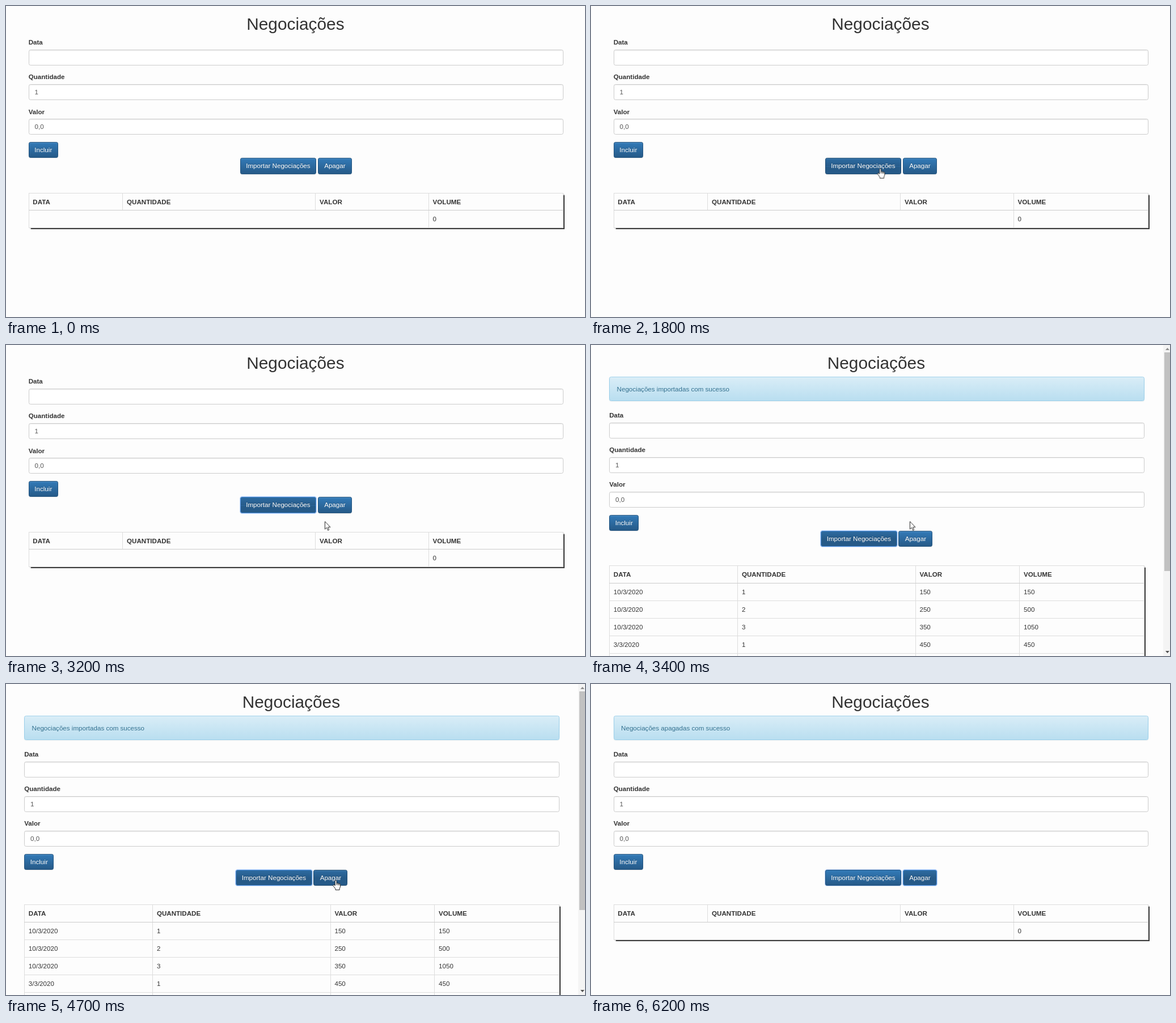
Animation of 1021 by 549 pixels, one loop 8 s. Source, as an HTML page:

```html
<!DOCTYPE html>
<html lang="pt">
<head>
<meta charset="utf-8">
<title>Negociações</title>
<style>
* { box-sizing: border-box; }
html, body { margin: 0; width: 100%; height: 100%; overflow: hidden; background: #fdfdfd; }
body {
  position: relative;
  font: 11.6px/16.6px "Liberation Sans", Arial, sans-serif;
  color: #333;
  white-space: nowrap;
}
.page, .form, .alert, .btn, .table, .bar, .cursor { position: absolute; }

/* Every state change is a hard cut on one 8 s timeline. */
.page, .form, .alert, .btn, .table, .bar, .cursor, .alert span, .cursor path {
  animation: 8s step-end infinite;
}

.page { left: 0; top: 0; width: 1022.8px; height: 549px; animation-name: recentre; }
h1 {
  position: absolute; left: -1px; top: 15px; width: 100%; margin: 0;
  font-size: 29.8px; line-height: 33px; font-weight: 400; text-align: center;
}

.alert {
  left: 39.7px; top: 56.2px; width: 943.4px; height: 43.1px;
  border: 1px solid #9acfea; border-radius: 3.3px;
  background: linear-gradient(#d9edf7, #b9def0);
  box-shadow: inset 0 1px 0 rgba(255,255,255,.25), 0 1px 2px rgba(0,0,0,.05);
  color: #31708f; text-shadow: 0 1px 0 rgba(255,255,255,.2);
  visibility: hidden; animation-name: alerted;
}
.alert span { position: absolute; left: 12.4px; top: 12.5px; }
.alert .loaded { animation-name: filled; }
.alert .wiped { animation-name: wiped; }

.form { left: 39.7px; top: 56.2px; width: 943.4px; animation-name: pushed; }
.form > b { display: block; height: 20.7px; }
.input {
  height: 28.2px; margin-bottom: 12.3px; padding-left: 9.9px; line-height: 26.2px;
  color: #555; background: #fff; border: 1px solid #ccc; border-radius: 3.3px;
  box-shadow: inset 0 1px 1px rgba(0,0,0,.075);
}

.btn {
  height: 28.2px; line-height: 26.2px; text-align: center; color: #fff;
  border: 1px solid #245580; border-radius: 3.3px;
  background: #265a88 linear-gradient(#337ab7, #265a88) repeat-x;
  box-shadow: inset 0 1px 0 rgba(255,255,255,.15), 0 1px 1px rgba(0,0,0,.075);
  text-shadow: 0 -1px 0 rgba(0,0,0,.2);
}
.add { left: 0; top: 184px; width: 52.2px; }
.import { left: 373px; top: 212.2px; width: 134.4px; animation-name: import; }
.erase { left: 510.3px; top: 212.2px; width: 59.8px; animation-name: erase; }

.table {
  left: 0; top: 273.4px; width: 943.4px; display: grid; grid-auto-rows: 30.9px;
  border: solid #ddd; border-width: 0 1px 1px 0; background: #fdfdfd;
  box-shadow: 1.7px 1.7px .8px #3c3c3c;
}
.table > * {
  padding-left: 6.6px; line-height: 30px;
  border: solid #ddd; border-width: 1px 0 0 1px;
}
.table b { position: relative; box-shadow: 0 1px #ccc; }
.table i { font-style: normal; }
.empty { grid-template-columns: 165.8px 340px 199.5px 1fr; animation-name: emptied; }
.empty .wide { grid-column: span 3; }
.full { grid-template-columns: 226.1px 313.6px 183.6px 1fr; visibility: hidden; animation-name: filled; }

.bar {
  left: 1009px; top: 0; width: 12px; height: 549px; background: #f4f4f4;
  visibility: hidden; animation-name: filled;
}
.bar svg { display: block; }

.cursor {
  left: 0; top: 0; width: 20px; height: 22px; overflow: visible;
  visibility: hidden; animation-name: travel, seen;
}
.cursor path { fill: #fff; stroke: #111; stroke-width: .9; stroke-linejoin: round; }
.cursor .arrow { animation-name: arrow; }
.cursor .hand { animation-name: hand; }

@keyframes recentre { 0% { left: 0; } 42.5% { left: -7.5px; } 63.75%, 100% { left: 0; } }
@keyframes pushed { 0% { top: 56.2px; } 42.5%, 100% { top: 115.9px; } }
@keyframes alerted { 0% { visibility: hidden; } 42.5%, 100% { visibility: visible; } }
@keyframes filled { 0% { visibility: hidden; } 42.5% { visibility: visible; } 63.75%, 100% { visibility: hidden; } }
@keyframes emptied { 0% { visibility: visible; } 42.5% { visibility: hidden; } 63.75%, 100% { visibility: visible; } }
@keyframes wiped { 0% { visibility: hidden; } 63.75%, 100% { visibility: visible; } }

@keyframes import {
  0% { background-position: 0 0; }
  18.75% { background-position: 0 -12.4px; border-color: #204d74; }
  25% {
    background-position: 0 -12.4px; border-color: #4f8fd6;
    box-shadow: 0 0 0 1px rgba(77,144,254,.35);
  }
  62.5%, 100% { background-position: 0 0; border-color: #245580; }
}
@keyframes erase {
  0% { background-position: 0 0; }
  47.5% { background-position: 0 -12.4px; border-color: #204d74; }
  62.5%, 100% {
    background-position: 0 -12.4px; border-color: #4f8fd6;
    box-shadow: 0 0 0 1px rgba(77,144,254,.35);
  }
}

@keyframes seen { 0% { visibility: hidden; } 10% { visibility: visible; } 77.5%, 100% { visibility: hidden; } }
@keyframes arrow { 0% { opacity: 1; } 18.75% { opacity: 0; } 36.25% { opacity: 1; } 47.5% { opacity: 0; } 72.5%, 100% { opacity: 1; } }
@keyframes hand { 0% { opacity: 0; } 18.75% { opacity: 1; } 36.25% { opacity: 0; } 47.5% { opacity: 1; } 72.5%, 100% { opacity: 0; } }
@keyframes travel {
  0%, 10% { transform: translate(72px, 413px); }
  11.25% { transform: translate(186px, 391px); }
  12.5% { transform: translate(286px, 367px); }
  13.75% { transform: translate(362px, 347px); }
  15% { transform: translate(415px, 333px); }
  16.25% { transform: translate(452px, 325px); }
  17.5% { transform: translate(478px, 309px); }
  18.75% { transform: translate(498px, 293px); }
  20% { transform: translate(509px, 283px); }
  21.25% { transform: translate(510px, 285px); }
  22.5% { transform: translate(510px, 287px); }
  26.25% { transform: translate(509px, 288px); }
  28.75% { transform: translate(507px, 288px); }
  33.75% { transform: translate(510px, 289px); }
  35% { transform: translate(517px, 292px); }
  36.25% { transform: translate(528px, 297px); }
  37.5% { transform: translate(541px, 303px); }
  38.75% { transform: translate(554px, 309px); }
  40% { transform: translate(562px, 311.5px); }
  43.75% { transform: translate(563px, 314px); }
  45% { transform: translate(565px, 319px); }
  46.25% { transform: translate(567px, 327px); }
  47.5% { transform: translate(569px, 336px); }
  48.75% { transform: translate(571px, 343px); }
  50% { transform: translate(573px, 348px); }
  51.25% { transform: translate(574px, 350px); }
  52.5% { transform: translate(575px, 351.5px); }
  53.75% { transform: translate(576px, 351px); }
  55% { transform: translate(578px, 350px); }
  56.25% { transform: translate(580px, 349px); }
  57.5% { transform: translate(581px, 347.5px); }
  58.75% { transform: translate(581.6px, 346.5px); }
  71.25% { transform: translate(590px, 352px); }
  72.5% { transform: translate(612px, 366px); }
  73.75% { transform: translate(640px, 386px); }
  75% { transform: translate(672px, 410px); }
  76.25%, 100% { transform: translate(705px, 434px); }
}
</style>
</head>
<body>
<div class="page">
  <h1>Negociações</h1>
  <div class="alert">
    <span class="loaded">Negociações importadas com sucesso</span>
    <span class="wiped">Negociações apagadas com sucesso</span>
  </div>
  <div class="form">
    <b>Data</b><div class="input"></div>
    <b>Quantidade</b><div class="input">1</div>
    <b>Valor</b><div class="input">0,0</div>
    <div class="btn add">Incluir</div>
    <div class="btn import">Importar Negociações</div>
    <div class="btn erase">Apagar</div>
    <div class="table empty">
      <b>DATA</b><b>QUANTIDADE</b><b>VALOR</b><b>VOLUME</b>
      <i class="wide"></i><i>0</i>
    </div>
    <div class="table full">
      <b>DATA</b><b>QUANTIDADE</b><b>VALOR</b><b>VOLUME</b>
      <i>10/3/2020</i><i>1</i><i>150</i><i>150</i>
      <i>10/3/2020</i><i>2</i><i>250</i><i>500</i>
      <i>10/3/2020</i><i>3</i><i>350</i><i>1050</i>
      <i>3/3/2020</i><i>1</i><i>450</i><i>450</i>
      <i></i><i></i><i></i><i></i>
    </div>
  </div>
</div>
<div class="bar">
  <svg width="12" height="549">
    <path d="M2 13h10v386H2z" fill="#c1c1c1"/>
    <path d="M4 9l3.5-4 3.5 4z" fill="#8c8c8c"/>
    <path d="M4 540l3.5 4 3.5-4z" fill="#505050"/>
  </svg>
</div>
<svg class="cursor">
  <path class="arrow" d="M.4 0V13.6L3.5 10.8 5.6 15.7 7.7 14.8 5.7 10.1H10Z"/>
  <g transform="translate(-5.6 -.5)">
    <path class="hand" d="M4.2 10V1.9a1.4 1.4 0 0 1 2.8 0V6.2a1.3 1.3 0 0 1 2.4.3a1.2 1.2 0 0 1 2.2.5a1.1 1.1 0 0 1 1.9.8V12l-1.4 3.2V17.5H5V15.6L1 10.2a1.3 1.3 0 0 1 1.9-1.6ZM7 6.2V9M9.4 6.5V9.3M11.6 7V9.5"/>
  </g>
</svg>
</body>
</html>
```
